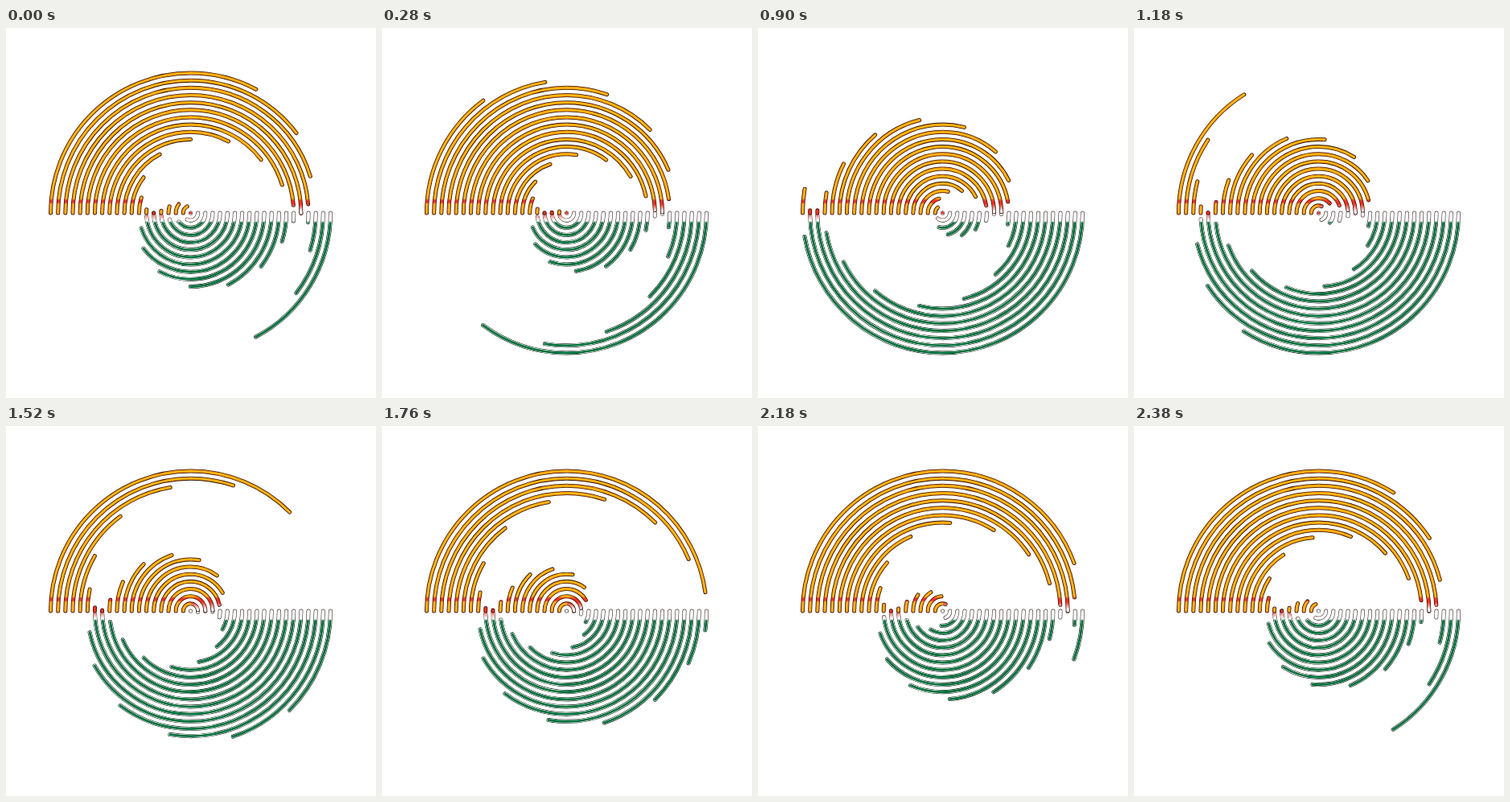
These frames come from a looping animation (460x460 px, 2400 ms). An HTML page with a canvas:

```html
<!DOCTYPE html>
<html>
<head>
<meta charset="utf-8">
<style>
  html, body { margin: 0; width: 100%; height: 100%; overflow: hidden; background: #fff; }
  canvas { display: block; }
</style>
</head>
<body>
<canvas id="stage" width="460" height="460"></canvas>
<script>
const ctx = document.getElementById('stage').getContext('2d');
const CX = 229.5, CY = 230, COUNT = 20, GAP = 174 / 19;
const LOOP = 2400, STEP = 20, TAU = Math.PI * 2;

// Vertical gradient over the stage from [y, colour] stops
function vertical(...stops) {
  const gradient = ctx.createLinearGradient(0, 0, 0, 460);
  for (const [y, color] of stops) gradient.addColorStop(y / 460, color);
  return gradient;
}

const ORANGE = '#fb8a12', YELLOW = '#fdc010', RED = '#fa3022';
const NO_YELLOW = 'rgba(253,192,16,0)', NO_GREEN = 'rgba(0,112,60,0)';
const upperLeft = vertical([212, ORANGE], [214, RED], [217, RED], [219, ORANGE], [232, ORANGE]);
const upperRight = vertical([212, ORANGE], [215, RED], [219, RED], [228, '#fff']);
const upperGlow = vertical([212, YELLOW], [214, NO_YELLOW], [217, NO_YELLOW], [219, YELLOW]);
const lowerLeft = vertical([230, RED], [234, '#fd9a92'], [239, '#fff']);
const lowerCore = vertical([240, NO_GREEN], [242, '#00703c']);
const upperEdge = vertical([212, '#2c1606'], [230, '#3c1410']);
const lowerEdge = vertical([238, '#4a3838'], [243, '#0a1c14']);

function arc(r, from, to, width, style) {
  ctx.beginPath();
  ctx.arc(CX, CY, r, from, to + 0.001);
  ctx.lineWidth = width;
  ctx.strokeStyle = style;
  ctx.stroke();
}

function drawUpper(r, sweep) {
  const end = Math.PI + sweep, top = Math.PI * 1.5;
  arc(r, Math.PI, end, 5, upperEdge);
  if (sweep < 0.04) return arc(r, Math.PI, end, 3.4, RED);
  arc(r, Math.PI, Math.min(end, top), 3.4, upperLeft);
  if (end > top) arc(r, top, end, 3.4, upperRight);
  arc(r, Math.PI, Math.min(end, TAU - Math.asin(Math.min(1, 18 / r))), 1.7, upperGlow);
}

function drawLower(r, sweep) {
  const bottom = Math.PI / 2;
  arc(r, 0, sweep, 5, lowerEdge);
  arc(r, 0, sweep, 3.7, '#fff');
  if (sweep > bottom) arc(r, bottom, sweep, 3.4, lowerLeft);
  arc(r, 0, sweep, 2.8, lowerCore);
}

function drawRing(k, phase) {
  const r = Math.max(k * GAP, 0.1);
  const sweep = Math.PI / 2 * (1 + Math.sin(TAU * (k - 10) / COUNT + phase));
  drawLower(r, Math.PI - sweep);
  if (k > 0) drawUpper(r, sweep);
}

function draw() {
  const t = Math.floor(performance.now() % LOOP / STEP) * STEP;
  ctx.fillStyle = '#fff';
  ctx.fillRect(0, 0, 460, 460);
  ctx.lineCap = 'round';
  for (let k = 0; k < COUNT; k++) drawRing(k, TAU * t / LOOP);
  requestAnimationFrame(draw);
}
draw();
</script>
</body>
</html>
```
